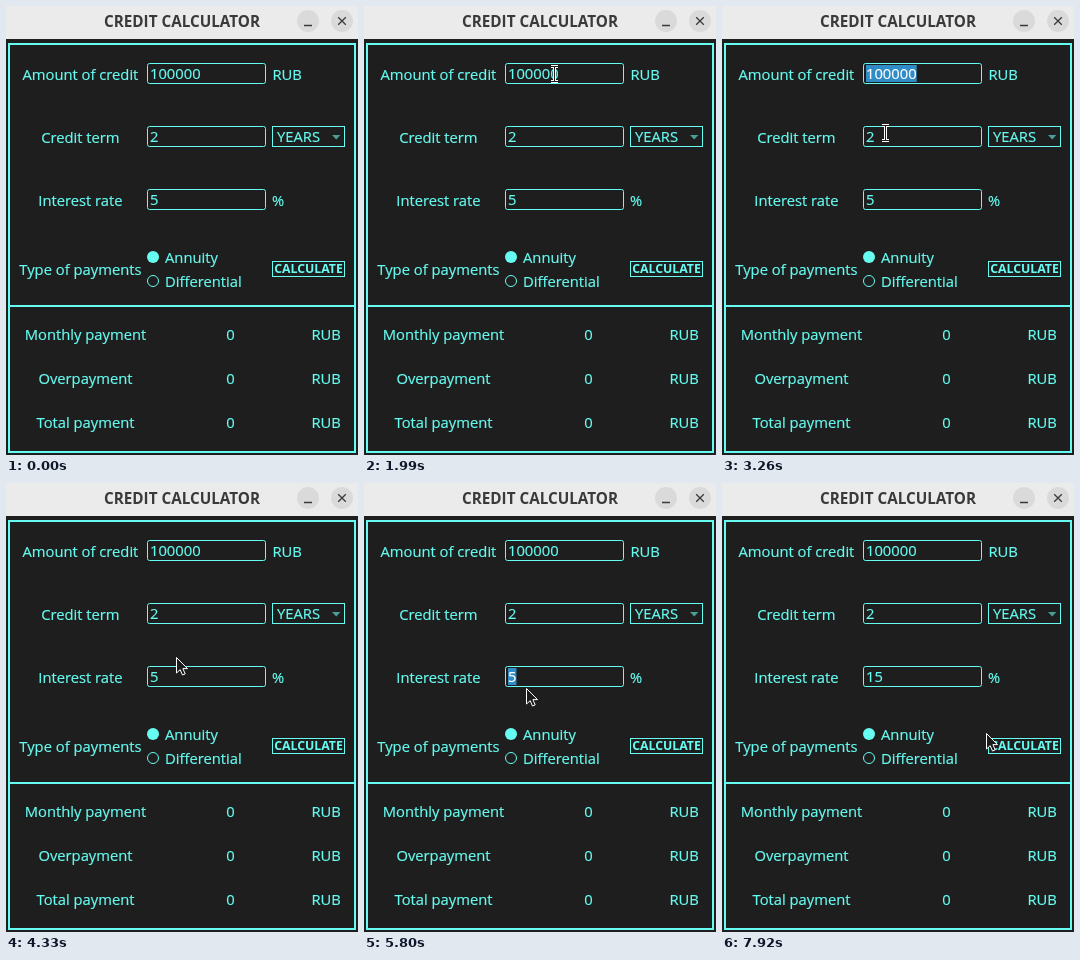
Animation, 352 px wide and 449 px high, one loop 7990 ms. Source, as an HTML page:

```html
<!DOCTYPE html>
<html lang="en">
<head>
<meta charset="utf-8">
<title>Credit calculator</title>
<style>
  html, body { margin: 0; width: 100%; height: 100%; overflow: hidden; background: #1e1e1e; }
  svg { display: block; width: 100vw; height: 100vh; }
  text { font: 14.75px "Open Sans", "Noto Sans", sans-serif; fill: #66fcf1; stroke: #66fcf1; stroke-width: .2; white-space: pre; }
  .mid { text-anchor: middle; }
  .title { font-size: 15.25px; font-weight: 700; fill: #3a3a3a; stroke: none; }
  .button { font-size: 12.3px; font-weight: 700; stroke: none; }
  .line { fill: none; stroke: #66fcf1; }
  .glyph { fill: none; stroke: #3a3a3a; stroke-width: 1.3; }
  .selected { fill: #fff; stroke: #fff; }
</style>
</head>
<body>
<svg viewBox="0 0 352 449">
  <rect width="352" height="449" fill="#1e1e1e"/>
  <rect width="352" height="33" fill="#ebebeb"/>
  <text class="mid title" x="176" y="21">CREDIT CALCULATOR</text>
  <g fill="#dadada">
    <circle cx="302" cy="15" r="11"/>
    <circle cx="336" cy="15" r="11"/>
  </g>
  <path class="glyph" d="M298 19.5h8M332.2 11.2l7.6 7.6m0-7.6l-7.6 7.6"/>

  <path class="line" stroke-width="2" d="M3 38H349V446H3ZM3 300H349"/>
  <g class="line">
    <rect x="266.5" y="120.5" width="72" height="20"/>
    <rect x="266.5" y="255.5" width="72" height="15"/>
    <circle cx="147" cy="275" r="5.5"/>
  </g>
  <circle cx="147" cy="251" r="6" fill="#66fcf1"/>
  <path d="M326 129h8.4l-4.2 4.4z" fill="#4a9e97"/>
  <text x="271" y="136">YEARS</text>
  <text class="mid button" x="302.5" y="267">CALCULATE</text>

  <g id="labels"></g>
  <g id="fields"></g>
  <rect id="caret" width="1" height="17" fill="#66fcf1"/>

  <path id="arrow" d="M0 .5V16L3.7 12.7 6 18 8.7 16.9 6.4 11.6H11Z" fill="#1b1b1b" stroke="#fff" stroke-linejoin="round"/>
  <g id="beam" fill="none">
    <path d="M-3.5 -7.5H3.5M-3.5 7.5H3.5M0 -7.5V7.5" stroke="#fff" stroke-width="3"/>
    <path d="M-3.5 -7.5H3.5M-3.5 7.5H3.5M0 -7.5V7.5" stroke="#1b1b1b"/>
  </g>
</svg>
<script>
const NS = "http://www.w3.org/2000/svg";
const LOOP = 7990, STEP = 66.6, BLINK = 9;
const DIGIT = 8.45, TEXT_X = 144;
const byId = id => document.getElementById(id);
const fieldTop = i => 57 + 63 * i;

function add(parent, tag, attrs, content = "") {
  const el = document.createElementNS(NS, tag);
  set(el, attrs);
  el.textContent = content;
  parent.append(el);
  return el;
}

function set(el, attrs) {
  for (const key in attrs) el.setAttribute(key, attrs[key]);
}

const show = (el, on) => { el.style.display = on ? "" : "none"; };

const label = (x, y, content, cls = "mid") => add(byId("labels"), "text", { x, y, class: cls }, content);
["Amount of credit", "Credit term", "Interest rate"].forEach((name, i) => label(74.4, fieldTop(i) + 17, name));
label(74.4, 269, "Type of payments");
label(266.5, 74, "RUB", "");
label(266, 200, "%", "");
label(159, 257, "Annuity", "");
label(159, 281, "Differential", "");
["Monthly payment", "Overpayment", "Total payment"].forEach((name, i) => {
  const y = 334 + 44 * i;
  label(79.5, y, name);
  label(224.5, y, "0");
  label(320.2, y, "RUB");
});

const fields = [0, 1, 2].map(i => {
  const root = byId("fields"), top = fieldTop(i);
  add(root, "rect", { x: 141.5, y: top + .5, width: 118, height: 20, rx: 2, class: "line" });
  return {
    mark: add(root, "rect", { y: top + 2, height: 17, fill: "#308cc6" }),
    text: add(root, "text", { x: TEXT_X, y: top + 16 })
  };
});

function setField(i, value, from = value.length) {
  const { mark, text } = fields[i];
  text.textContent = value;
  text.setAttribute("class", from < value.length ? "selected" : "");
  set(mark, { x: TEXT_X + from * DIGIT, width: (value.length - from) * DIGIT });
}

// The pointer rests between moves; times are in steps.
const enter = { x: 346, y: 213 };
const moves = [
  { from: 14, to: 21, x: 211, y: 130 },   // in to the term
  { from: 21, to: 27, x: 199, y: 69 },    // up to the amount
  { from: 29, to: 37, x: 137, y: 59 },    // select it
  { from: 37, to: 41, x: 122, y: 60 },
  { from: 42, to: 49, x: 163.5, y: 127 }, // click the term
  { from: 55, to: 65, x: 171, y: 174 },   // down to the rate
  { from: 65, to: 69, x: 172, y: 192 },
  { from: 74, to: 83, x: 142, y: 190 },   // select it
  { from: 83, to: 87, x: 163, y: 205 },
  { from: 87, to: 91, x: 184, y: 220 },   // step aside
  { from: 110, to: 119, x: 265, y: 250 }  // over to the button
];

function pointerAt(step) {
  let { x, y } = enter;
  for (const move of moves) {
    if (step <= move.from) break;
    const u = Math.min(1, (step - move.from) / (move.to - move.from));
    x += (move.x - x) * u;
    y += (move.y - y) * u;
  }
  return { x, y };
}

const within = (v, from, to) => v >= from && v < to;

// Left end of a selection dragged leftwards until a given step
function selectFrom(step, dragEnd, length) {
  const { x } = pointerAt(Math.min(step, dragEnd));
  return Math.max(0, Math.min(length, Math.round((x - TEXT_X) / DIGIT)));
}

// Each click, drag or key press places the caret and restarts its blinking.
const edits = [
  { at: 51, field: 1, char: 1, rate: "5" },
  { at: 69, field: 2, char: 1, rate: "5" },
  { at: 76, field: 2, char: 0, rate: "5" },
  { at: 97, field: 2, char: 1, rate: "1" },
  { at: 102, field: 2, char: 2, rate: "15" }
];

function drawFields(step) {
  const edit = edits.findLast(e => e.at <= step);
  const rate = edit ? edit.rate : "5";
  setField(0, "100000", within(step, 29, 51) ? selectFrom(step, 41, 6) : 6);
  setField(1, "2");
  setField(2, rate, within(step, 74, 97) ? selectFrom(step, 83, 1) : rate.length);

  const lit = edit && Math.floor((step - edit.at) / BLINK) % 2 === 0;
  show(byId("caret"), lit);
  if (lit) set(byId("caret"), { x: Math.round(TEXT_X + edit.char * DIGIT), y: fieldTop(edit.field) + 2 });
}

function drawPointer(step) {
  const { x, y } = pointerAt(step);
  const overField = within(x, 141, 260) && fields.some((_, i) => within(y, fieldTop(i), fieldTop(i) + 21));
  const beam = overField || within(step, 29, 42);
  const visible = step >= moves[0].from;
  show(byId("beam"), visible && beam);
  show(byId("arrow"), visible && !beam);
  set(byId(beam ? "beam" : "arrow"), { transform: `translate(${Math.round(x) - .5} ${Math.round(y)})` });
}

const start = performance.now();
function tick() {
  const time = (performance.now() - start) % LOOP;
  const step = Math.min(119, Math.floor((time + 15) / STEP));
  drawFields(step);
  drawPointer(step);
  requestAnimationFrame(tick);
}
tick();
</script>
</body>
</html>
```
